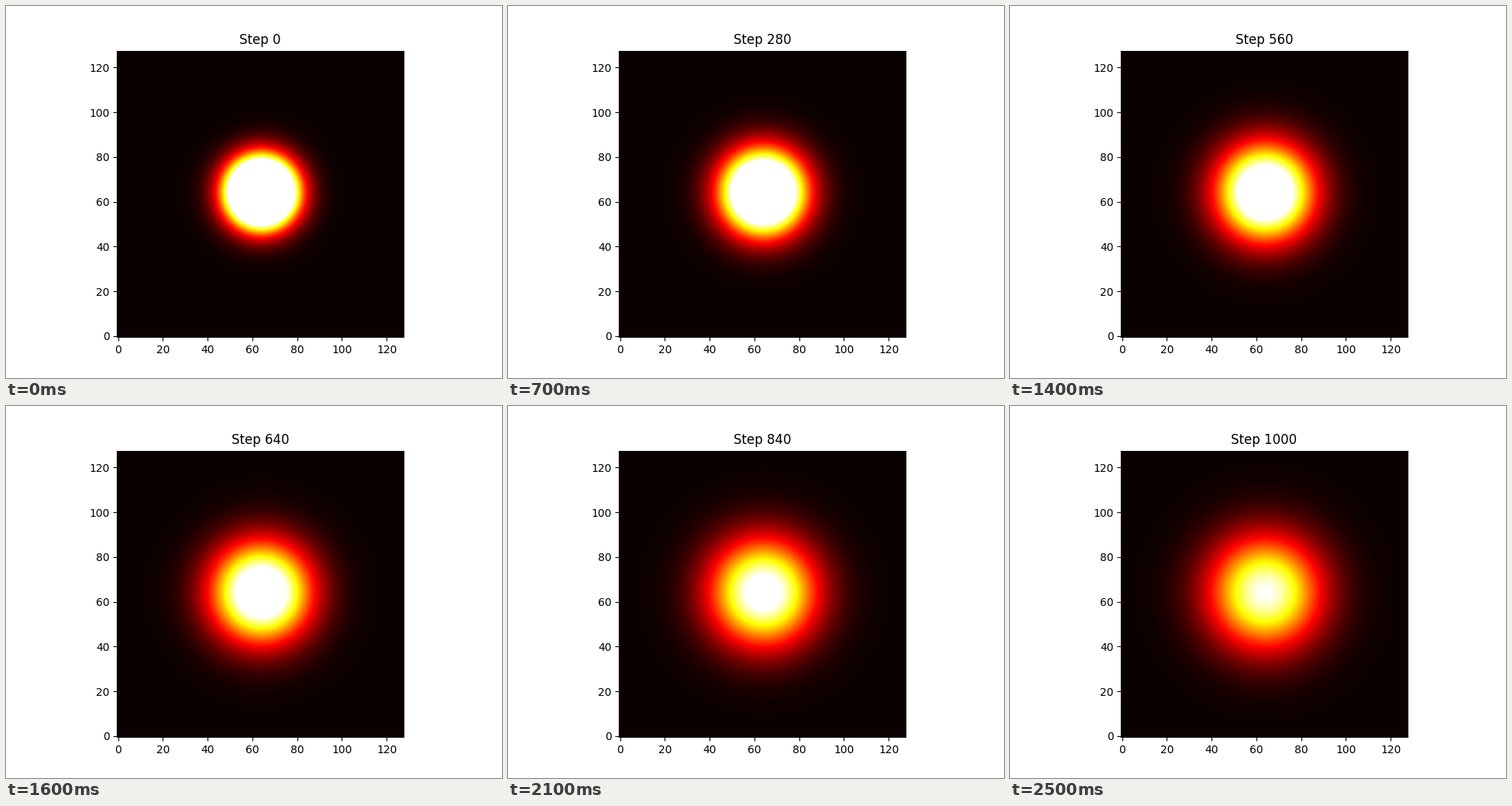
Write a matplotlib script that moves like this. It is 640 px wide and 480 px high and loops after 2600 ms.

```python
import numpy as np
import matplotlib.pyplot as plt
from matplotlib.animation import FuncAnimation

SIZE = 128
CENTER = SIZE // 2
FRAMES = 26
STEPS_PER_FRAME = 40
LAST_STEP = (FRAMES - 1) * STEPS_PER_FRAME

DIFFUSION = 0.1
START_VARIANCE = 100

rows, cols = np.mgrid[:SIZE, :SIZE]
radius_sq = (cols - CENTER) ** 2 + (rows - CENTER) ** 2


def heat(step):
    """Gaussian blob after diffusing for a number of unit time steps."""
    variance = START_VARIANCE + 2 * DIFFUSION * step
    return START_VARIANCE / variance * np.exp(-radius_sq / (2 * variance))


fig, ax = plt.subplots(figsize=(6.4, 4.8), dpi=100)
# The colour range is that of the final state, so earlier peaks saturate.
image = ax.imshow(heat(LAST_STEP), cmap="hot", origin="lower")
title = ax.set_title("Step 0")


def update(frame):
    step = frame * STEPS_PER_FRAME
    image.set_data(heat(step))
    title.set_text(f"Step {step}")
    return image, title


animation = FuncAnimation(fig, update, frames=FRAMES, interval=100,
                          repeat=True, repeat_delay=0, blit=False)
plt.show()
```
